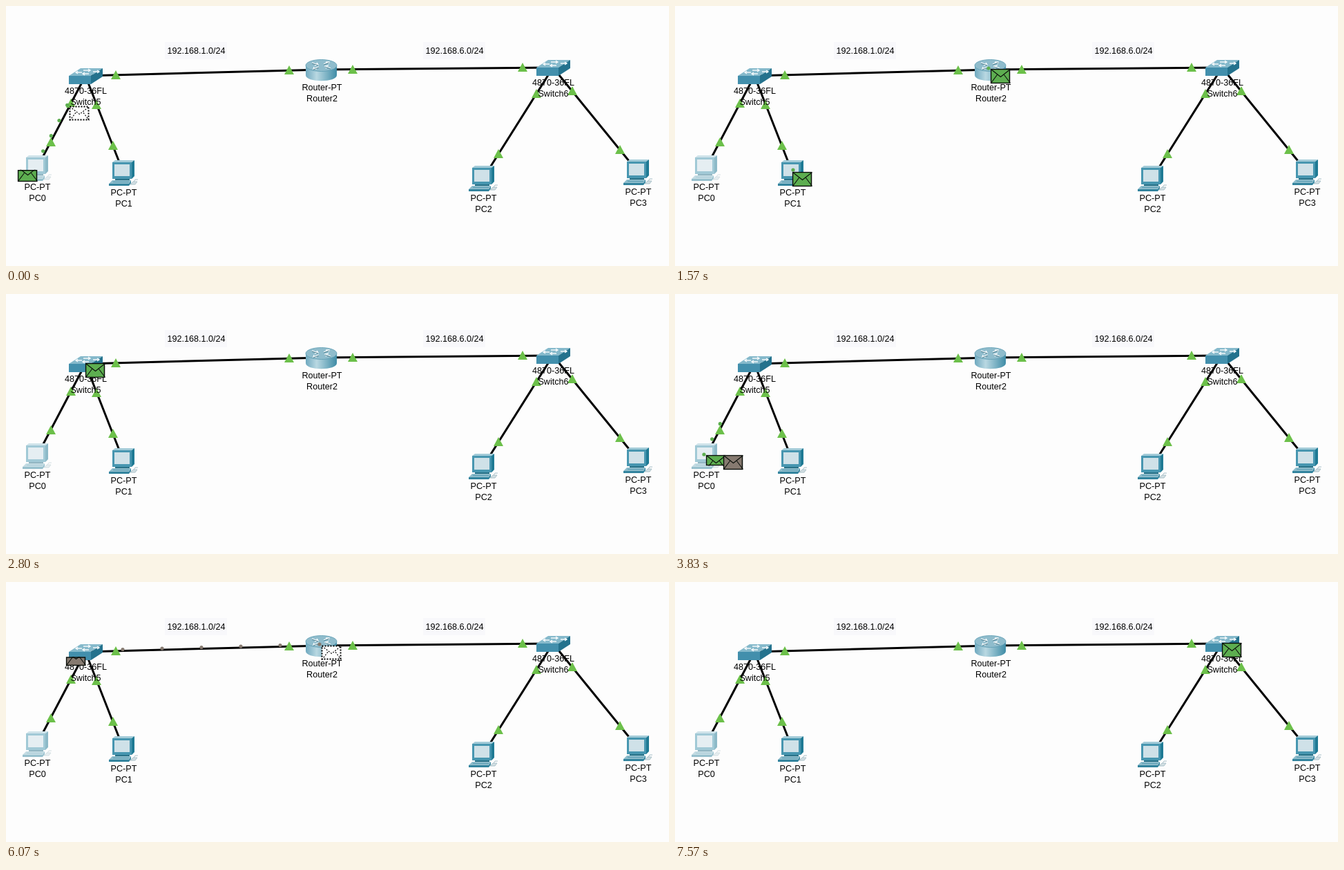
Recreate the animation shown at these times as an HTML page with a canvas. Size 960 by 376 pixels, loop 8000 ms.

```html
<!DOCTYPE html>
<html lang="en">
<head>
<meta charset="utf-8">
<title>Network simulation</title>
<style>
  html, body { margin: 0; width: 100%; height: 100%; overflow: hidden; background: #fdfdfd; }
  svg, canvas { position: absolute; left: 0; top: 0; width: 960px; height: 376px; }
  text { font: 12.6px "Liberation Sans", Arial, sans-serif; text-anchor: middle; fill: #000; }
  .link { stroke: #000; stroke-width: 3; }
  .port { fill: #6cc04a; }
  .arrow { fill: none; stroke: #f2f8fa; stroke-width: 1.4; }
</style>
</head>
<body>
<svg viewBox="0 0 960 376">
  <defs>
    <linearGradient id="metal">
      <stop offset="0" stop-color="#6fa9bf"/>
      <stop offset=".35" stop-color="#b9d8e2"/>
      <stop offset="1" stop-color="#3f8ca6"/>
    </linearGradient>
    <g id="pc">
      <path fill="#a3cbd8" d="M-16-15l4-3h28l-4 3z"/>
      <path fill="#1f7a94" d="M12-15l4-3V5l-4 4z"/>
      <path fill="#4796b0" d="M-16-15h28V9h-28z"/>
      <path fill="#cfe1e8" d="M-13-12H9V5h-22z"/>
      <path fill="#2a7288" d="M-12 9H9v2h-21z"/>
      <path fill="#8dbccb" d="M-16 11h27l-3 5h-29z"/>
      <path fill="#33849e" d="M-21 16H8l3-5v4l-3 4h-29z"/>
      <path fill="none" stroke="#5b9db3" d="M-15 13.500H8"/>
      <path fill="#d3dfe3" stroke="#9db8c1" stroke-width=".8" d="M10 17l4-4h6l-3 4z"/>
      <path fill="none" stroke="#a9c0c8" d="M15 13l2-3h4"/>
    </g>
    <g id="switch">
      <path fill="#85b9cb" d="M-24 0l17-11h32L8 0z"/>
      <path fill="#428fac" d="M-24 0H8v12h-32z"/>
      <path fill="#24728d" d="M8 0l17-11V1L8 12z"/>
      <path class="arrow" d="M-3-8H7m-3-2l3 2-3 2M11-6h9m-3-2l3 2-3 2M-5-5h-9m3-2l-3 2 3 2M5-3h-9m3-2l-3 2 3 2"/>
    </g>
    <g id="router">
      <path fill="url(#metal)" d="M-23-6V8C-23 19 22 19 22 8V-6z"/>
      <ellipse cx="-.5" cy="-6" rx="22.500" ry="8.500" fill="#8fbccc" stroke="#5b9bb2" stroke-width=".8"/>
      <path class="arrow" d="M-14-10l9 3m-5 1l5-1-2-3M13-2l-8-3m5-1l-5 1 2 3M3-8l8-3m-5 0h5l-1 3M-4-4l-8 3m5 0h-5l1-3"/>
      <path fill="none" stroke="#2f6678" stroke-width=".8" d="M-14-9l9 3M3-7l8-3M-4-3l-8 3M13-1l-8-3"/>
    </g>
  </defs>
  <rect x="230" y="52" width="90" height="25" fill="#f8f8fb"/>
  <rect x="604" y="52" width="90" height="25" fill="#f8f8fb"/>
  <g id="scene"></g>
</svg>
<canvas id="packets" width="960" height="376"></canvas>
<script>
const GREEN = '#5dae50', BROWN = '#867a70';
const W = 28, H = 20, LOOP = 8000, HOP = 578;

const nodes = {
  sw5: { x: 115, y: 101, icon: 'switch', names: ['4870-36FL', 'Switch5'], label: 127 },
  router: { x: 457, y: 92, icon: 'router', names: ['Router-PT', 'Router2'], label: 122 },
  sw6: { x: 792, y: 89, icon: 'switch', names: ['4870-36FL', 'Switch6'], label: 115 },
  pc0: { x: 45, y: 234, icon: 'pc', names: ['PC-PT', 'PC0'], label: 266, fade: .5 },
  pc1: { x: 170, y: 241, icon: 'pc', names: ['PC-PT', 'PC1'], label: 274 },
  pc2: { x: 691, y: 249, icon: 'pc', names: ['PC-PT', 'PC2'], label: 282 },
  pc3: { x: 915, y: 240, icon: 'pc', names: ['PC-PT', 'PC3'], label: 273 }
};
const { sw5, router, sw6, pc0, pc1, pc2, pc3 } = nodes;
const links = [[sw5, router], [router, sw6], [sw5, pc0], [sw5, pc1], [sw6, pc2], [sw6, pc3]];
const ports = [[159, 100], [410, 93], [502, 92], [748, 89], [94, 141], [131, 143],
  [65, 197], [155, 202], [768, 127], [820, 123], [713, 214], [889, 208]];

function buildScene() {
  const all = Object.values(nodes);
  const text = (x, y, s) => `<text x="${x}" y="${y}">${s}</text>`;
  document.getElementById('scene').innerHTML = [
    ...links.map(([a, b]) => `<line class="link" x1="${a.x}" y1="${a.y}" x2="${b.x}" y2="${b.y}"/>`),
    ...all.map(n => `<g transform="translate(${n.x} ${n.y})">` +
      (n.fade ? '<path fill="#fdfdfd" d="M-16-15l4-3h28V9l-5 10h-32l5-8z"/>' : '') +
      `<use href="#${n.icon}" opacity="${n.fade || 1}"/></g>`),
    ...ports.map(([x, y]) => `<path class="port" d="M${x} ${y - 7}l7 13h-14z"/>`),
    ...all.map(n => n.names.map((s, i) => text(n.x + .5, n.label + 16 * i, s)).join('')),
    text(275.5, 69, '192.168.1.0/24'), text(649.5, 69, '192.168.6.0/24')
  ].join('');
}

// A packet crosses a link from `start`, then rests at its end until `hold`.
const hops = [
  { from: pc0, to: sw5, color: GREEN, start: -83, hold: 1030, pace: .84 },
  { from: sw5, to: pc1, color: GREEN, start: 1030, hold: 1950, dot: [1, -4] },
  { from: sw5, to: router, color: GREEN, start: 1030, hold: 1608 },
  { from: router, to: sw5, color: GREEN, start: 2215, hold: 3470 },
  { from: sw5, to: pc0, color: GREEN, start: 3470, hold: 4150 },
  { from: pc0, to: sw5, color: BROWN, start: 4728, hold: 5900, pace: 1.12 },
  { from: sw5, to: router, color: BROWN, start: 5900, hold: 6600 },
  { from: router, to: sw6, color: GREEN, start: 6985, hold: LOOP }
];

// Outgoing packets glide to the left side of their device and wait there.
const slides = [
  { node: router, color: GREEN, dx: 0, start: 1608, glide: 607, end: 2215, power: 1 },
  { node: pc0, color: BROWN, dx: 70, start: 3665, glide: 900, end: 4728, power: 3 },
  { node: router, color: GREEN, dx: 70, start: 6095, glide: 890, end: 6985, power: 3 }
];

const ctx = document.getElementById('packets').getContext('2d');
const clamp = v => Math.min(1, Math.max(0, v));
const mix = (a, b, k) => a + (b - a) * k;

function flap(x, y) {
  ctx.beginPath();
  ctx.moveTo(x, y);
  ctx.lineTo(x + W / 2, y + 11);
  ctx.lineTo(x + W, y);
  ctx.moveTo(x, y + H);
  ctx.lineTo(x + 9, y + 8);
  ctx.moveTo(x + W, y + H);
  ctx.lineTo(x + W - 9, y + 8);
  ctx.stroke();
}

// Draws the part of an envelope between heights `top` and `bottom`.
function envelope(x, y, color, top = 0, bottom = H) {
  if (bottom - top < 1) return;
  x = Math.round(x) + .5;
  y = Math.round(y) - .5;
  ctx.save();
  ctx.beginPath();
  ctx.rect(x - 1, y + top - 1, W + 2, bottom - top + 2);
  ctx.clip();
  ctx.fillStyle = color;
  ctx.fillRect(x, y + top, W - 1, bottom - top);
  ctx.strokeStyle = '#0a0f0a';
  ctx.lineWidth = 1.1;
  flap(x, y);
  ctx.lineWidth = 1.5;
  ctx.strokeRect(x, y + top, W - 1, bottom - top);
  ctx.restore();
}

function ghost(x, y) {
  x = Math.round(x) + .5;
  y = Math.round(y) + .5;
  ctx.save();
  ctx.fillStyle = '#fff';
  ctx.fillRect(x, y, W - 1, H - 1);
  ctx.strokeStyle = '#000';
  ctx.setLineDash([2, 2]);
  ctx.lineWidth = 2;
  ctx.strokeRect(x, y, W - 1, H - 1);
  ctx.lineWidth = 1.2;
  flap(x, y);
  ctx.restore();
}

function drawHop({ from, to, color, start, hold, pace = 1, dot = [-3, -2] }, t) {
  const age = (t - start) / pace;
  if (age < 0 || t >= hold) return;
  if (age >= HOP) return envelope(to.x, to.y, color);

  ctx.fillStyle = color;
  for (let k = 1; k <= 6; k++) {
    if (age < 25 * k || age >= 110 + 78 * k) continue;
    ctx.beginPath();
    ctx.arc(mix(from.x, to.x, k / 6) + dot[0], mix(from.y, to.y, k / 6) + dot[1], 2.6, 0, 7);
    ctx.fill();
  }
  envelope(from.x - W, from.y, color, H * clamp((age - 30) / 330));
  const lead = clamp(age / 150), fill = clamp((age - 180) / 257);
  if (fill === 0) ghost(mix(from.x, to.x, lead), mix(from.y, to.y, lead));
  envelope(to.x, to.y, color, 0, H * fill);
}

function drawSlide({ node, color, dx, start, glide, end, power }, t) {
  if (t < start || t >= end) return;
  const left = (1 - clamp((t - start) / glide)) ** power;
  envelope(node.x + mix(-W, dx, left), node.y, color);
}

function frame() {
  const t = performance.now() % LOOP;
  ctx.clearRect(0, 0, 960, 376);
  hops.forEach(h => drawHop(h, t));
  slides.forEach(s => drawSlide(s, t));
  requestAnimationFrame(frame);
}

buildScene();
frame();
</script>
</body>
</html>
```
